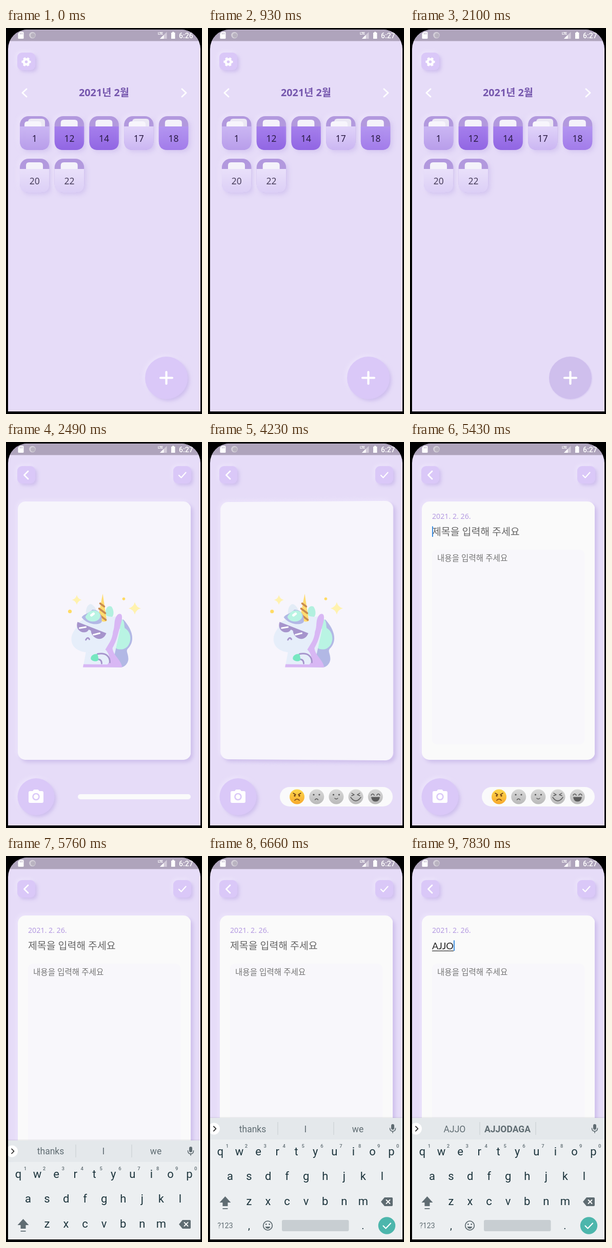
Recreate the animation shown at these times as an HTML page. Size 382 by 753 pixels, loop 8 s.

```html
<!DOCTYPE html>
<html lang="ko">
<head>
<meta charset="utf-8">
<title>Diary</title>
<style>
  html, body { margin: 0; width: 100%; height: 100%; overflow: hidden; background: #000; }
  #screen { position: absolute; left: 4px; top: 3px; width: 375px; height: 745px; overflow: hidden;
    background: #e6dcf8; border-radius: 38px 38px 0 0; }
  svg { position: absolute; left: 0; top: 0; width: 100%; height: 100%; }
  text { font-family: "Noto Sans", "Noto Sans CJK KR", "Noto Sans CJK JP", sans-serif; white-space: pre; }
  .mid { text-anchor: middle; }
  .ui { font-family: Roboto, sans-serif; }
  .line { fill: none; stroke-linecap: round; stroke-linejoin: round; }
  .raised { filter: drop-shadow(4px 4px 3px #cfbfee) drop-shadow(-3px -3px 4px #ece4fb); }
  .pocket { filter: drop-shadow(4px 4px 4px #d3c5f0) drop-shadow(-4px -4px 4px #ebe2fa); }
  #card { position: absolute; left: 18.5px; top: 113px; width: 337.5px; height: 504px; border-radius: 15px;
    box-shadow: 5px 5px 7px #cfc0ec, -3px -3px 7px #ece4fb; }
</style>
</head>
<body>
<div id="screen">
  <svg id="base" viewBox="4 3 375 745"></svg>
  <div id="card">
    <svg id="front" viewBox="22.5 116 337.5 504"></svg>
    <svg id="back" viewBox="22.5 116 337.5 504"></svg>
  </div>
  <svg id="top" viewBox="4 3 375 745"></svg>
</div>
<script>
const $ = id => document.getElementById(id);
const BUTTON = '#dac8f8';

const rect = (x, y, w, h, r, fill, more = '') =>
  `<rect x="${x}" y="${y}" width="${w}" height="${h}" rx="${r}" fill="${fill}" ${more}/>`;
const circle = (x, y, r, fill, more = '') => `<circle cx="${x}" cy="${y}" r="${r}" fill="${fill}" ${more}/>`;
const shape = (d, fill) => `<path d="${d}" fill="${fill}"/>`;
const line = (d, color, width) => `<path class="line" d="${d}" stroke="${color}" stroke-width="${width}"/>`;
const text = (x, y, size, fill, str, cls = '', more = '') =>
  `<text x="${x}" y="${y}" font-size="${size}" fill="${fill}" class="${cls}" ${more}>${str}</text>`;
const squareButton = (x, y) => rect(x, y, 35, 34, 9, BUTTON, 'class="raised"');
const show = (id, on) => { $(id).style.display = on ? '' : 'none'; };

// Home screen
function pocket(day, col, row, from, to, papers) {
  const x = 27 + col * 67.7, y = 172 + row * 83, id = 'g' + day;
  const paper = (dx, dy, fill) =>
    shape(`M${x + dx} ${y + 21}v${dy - 15}q0-6 6-6h21q6 0 6 6v${15 - dy}z`, fill);
  return `<linearGradient id="${id}" x2="0" y2="1"><stop stop-color="${from}"/><stop offset="1" stop-color="${to}"/></linearGradient>
    <g class="pocket">${rect(x, y, 57.5, 66, 17, '#b299de')}
    ${papers > 1 ? paper(16, 5, '#ebe8f4') + paper(9, 10, '#f7f5fc') : paper(12, 7, '#f4f2fa')}
    ${shape(`M${x} ${y + 20}h57.5v29q0 17-17 17h-23.5q-17 0-17-17z`, `url(#${id})`)}</g>
    ${text(x + 28.7, y + 50, 17.5, row ? '#493f5c' : '#2b1c45', day, 'mid', 'font-weight="300"')}`;
}

const home = `<g id="home">${squareButton(22, 48)}
  ${circle(39.5, 66, 5, 'none', 'stroke="#fff" stroke-width="4.4"')}
  ${circle(39.5, 66, 7.6, 'none', 'stroke="#fff" stroke-width="3" stroke-dasharray="4.3 3.66" stroke-dashoffset="2.15"')}
  ${line('M40 119l-8 7.5 8 7.5M343 119l8 7.5-8 7.5', '#fff', 2.8)}
  ${text(191, 133, 19.8, '#7556ad', '2021년 2월', 'mid', 'font-weight="600"')}
  ${pocket(1, 0, 0, '#cab6f3', '#b89dea', 2)}
  ${pocket(12, 1, 0, '#a57fec', '#9166e3', 1)}
  ${pocket(14, 2, 0, '#a57fec', '#9166e3', 1)}
  ${pocket(17, 3, 0, '#e0d3f9', '#cbb6f2', 2)}
  ${pocket(18, 4, 0, '#b395f0', '#a27cea', 1)}
  ${pocket(20, 0, 1, '#e9e0fa', '#dccff6', 1)}
  ${pocket(22, 1, 1, '#e9e0fa', '#dccff6', 1)}
  ${circle(312.5, 682.5, 41.5, BUTTON, 'id="add"')}
  ${line('M301 682.5h23M312.5 671v23', '#fff', 4.2)}</g>`;

// Editor screen
const INK = '#5d4a3c';
const faces = [
  line('M166 685l5 3M181 685l-5 3M169 699q4.500-5 9 0', '#6b3c12', 1.6) +
    circle(169, 690, 1.7, '#6b3c12') + circle(178, 690, 1.7, '#6b3c12'),
  circle(206, 688, 1.6, '#555') + circle(217, 688, 1.6, '#555') + line('M208.500 698q3-4 6 0', '#555', 1.3),
  circle(244.500, 688, 1.6, '#555') + circle(255.500, 688, 1.6, '#555') + line('M247 695q3 3 6 0', '#555', 1.3),
  line('M280 685l5 3-5 2M296 685l-5 3 5 2M278 693q10 14 20 0', '#555', 1.4),
  line('M318 689q3-5 6 0M329 689q3-5 6 0', '#555', 1.6) + shape('M318 692.500h17q-1 9-8.500 9t-8.500-9z', '#5a5a5a')
];
const emojis = faces.map((face, i) =>
  circle(173.5 + i * 38.2, 692, 14.5, i ? 'url(#grey)' : 'url(#gold)') + face).join('');

const editor = `<g id="editor">
  <linearGradient id="gold" x2="0" y2="1"><stop stop-color="#fdd84e"/><stop offset="1" stop-color="#f7a92c"/></linearGradient>
  <linearGradient id="grey" x2="0" y2="1"><stop stop-color="#d9d9d9"/><stop offset="1" stop-color="#b9b9b9"/></linearGradient>
  ${squareButton(22, 47)}${squareButton(326, 47)}
  ${line('M43 57l-7.500 7.500 7.500 7.500', '#fff', 2.8)}${line('M337 65l4.500 4.500 9-10', '#fff', 2.2)}
  ${circle(58.5, 692, 36, BUTTON, 'class="raised"')}
  ${shape('M47 681h5l2.500-3h8l2.500 3h5q3 0 3 3v17q0 3-3 3h-23q-3 0-3-3v-17q0-3 3-3z', '#fff')}
  ${circle(58.5, 692, 6, 'none', `stroke="${BUTTON}" stroke-width="2.6"`)}
  ${rect(140, 687, 220, 10, 5, '#fafafb', 'id="bar"')}
  <g id="emojis">${emojis}</g></g>`;

const sparkle = (x, y, r) => shape(`M${x} ${y - r}q${r * .2} ${r * .8} ${r} ${r}q${-r * .8} ${r * .2} ${-r} ${r}` +
  `q${-r * .2} ${-r * .8} ${-r} ${-r}q${r * .8} ${-r * .2} ${r} ${-r}z`, '#fff2ae');
const LILAC = '#b2b8e5', MINT = '#b9f4e3', PALE = '#e6eefa', PLUM = '#a694cc';

const unicorn = sparkle(137.5, 308, 9.5) + sparkle(250.5, 324.5, 12) +
  circle(124, 330.5, 3.6, '#ffdb63') + circle(229, 306, 2.8, '#ffdb63') +
  shape('M228 346C248 368 250 388 239 401C231 408 238 410 238 424C237 433 230 439 224 439.500L190 439 215 360z', LILAC) +
  shape('M224 344C232 350 229 358 231 363C247 372 245 399 228 404C213 407 205 398 212 380z', MINT) +
  shape('M156 338C153 324 161 313 167 317Q175 322 177 334z', '#e3ecf6') +
  shape('M194 338C192 324 198 318 205 321C211 329 210 341 204 343z', '#b2f0df') +
  shape('M150 438L156 406 200 350 222 365 206 438z', PALE) +
  shape('M127 385C127 369 139 364 140 352Q168 334 205 341L220 340 207 390C202 409 188 412 172 410C149 413 127 405 127 385z', PALE) +
  shape('M218 336C229 332 226 348 222 360C217 376 216 386 207 402C208 416 224 425 226 439.500H149.500L150.500 433.500 197 434C206 425 199 410 193 405C200 393 207 385 208 370C213 358 208 345 218 336z', '#d8b7f4') +
  shape('M188 296L179 343Q186 354 196 349z', '#ffdc70') +
  line('M183 315l8 6M181 325l12 9M181 337l13 10', '#c98b4f', 3.6) +
  shape('M147 342C150 336 160 335 168 327C181 327 188 338 186 351C180 359 157 356 147 342z', LILAC) +
  shape('M154 341C160 330 170 325 179 331C187 338 183 348 172 350C162 351 156 347 154 341z', MINT) +
  line('M166 338l4-3', '#fff', 5) +
  shape('M139 351L195 373C192 381 186 385 179 384C170 382 165 374 165 368L161 366C158 371 153 372 148 371C138 368 136 358 139 351z', PLUM) +
  line('M143 363l12-2M170 376l12-3', '#fff', 3) +
  line('M155 386q4-7 7-1', PLUM, 2.8) +
  line('M178 413.500C195 410 202 419 202 430M180 424Q186 425 186 432', PLUM, 3) +
  shape('M165 424C163 417 172 412 178 414L180 424C178 430 168 428 165 424z', '#76e7c1');

$('front').innerHTML = rect(22.5, 116, 337.5, 504, 15, '#f7f5fc') + unicorn;
$('back').innerHTML = rect(22.5, 116, 337.5, 504, 15, '#fafafa') +
  rect(42, 210, 298, 380, 10, '#f8f7fb') +
  text(42.5, 150, 14.2, '#b59be2', '2021. 2. 26.') +
  text(42.5, 182, 19.4, '#666', '제목을 입력해 주세요', '', 'id="hint" font-weight="500"') +
  text(52.5, 232, 15.6, '#757575', '내용을 입력해 주세요') +
  text(42.5, 182, 18.2, '#222', '', '', 'id="typed" style="font-family:Lato,sans-serif"') +
  rect(42.5, 184.5, 0, 1.3, 0, '#333', 'id="underline"') +
  rect(42.5, 164.5, 2, 20.5, 0, '#3e8ee0', 'id="cursor"');

// Keyboard
const KEY = '#1c343c', MUTED = '#5f6c72';
const keyRow = (letters, x, y) => [...letters].map((c, i) =>
  text(x + i * 37.05, y, 22, KEY, c, 'ui mid')).join('');
const digits = [...'1234567890'].map((d, i) =>
  text(37.500 + i * 36.9, 569, 9.5, MUTED, d, 'ui mid', 'font-weight="500"')).join('');

const keyboard = `<g id="keyboard">
  ${rect(4, 509, 375, 3, 0, '#0000000d')}${rect(4, 511, 375, 42, 0, '#e4e8eb')}${rect(4, 553, 375, 195, 0, '#eceff1')}
  ${circle(11.5, 532, 11.5, '#fff')}${line('M11 527.500l4.500 4.500-4.500 4.500', '#333', 1.8)}
  ${rect(135.5, 519, 1, 25, 0, '#c6cccf')}${rect(244.5, 519, 1, 25, 0, '#c6cccf')}
  ${[87, 190, 292].map((x, i) => text(x, 538.5, 17.5, MUTED, '', 'ui mid', `id="word${i}"`)).join('')}
  ${rect(357, 523, 6, 11, 3, MUTED)}${line('M354.500 531q0 6 5.500 6t5.500-6M360 537v3', MUTED, 1.6)}
  ${keyRow('qwertyuiop', 24, 584)}${digits}
  ${keyRow('asdfghjkl', 43, 632)}${keyRow('zxcvbnm', 80, 681)}
  ${shape('M33.500 664l11 12h-6v7h-10v-7h-6z', MUTED)}${rect(28.5, 687, 10, 1.8, 0, MUTED)}
  ${shape('M337 674.500l7-8.500h14q2 0 2 2v13q0 2-2 2h-14z', MUTED)}${line('M347.500 671l7 7M354.500 671l-7 7', '#fff', 1.9)}
  ${text(33.5, 726, 14, MUTED, '?123', 'ui mid')}${text(80, 728, 20, KEY, ',', 'ui mid')}${text(302, 728, 20, KEY, '.', 'ui mid')}
  ${circle(116.5, 721, 8.8, 'none', `stroke="${MUTED}" stroke-width="1.8"`)}
  ${circle(113.300, 718.5, 1.4, MUTED)}${circle(119.700, 718.5, 1.4, MUTED)}${shape('M111.500 723h10q-1.500 4-5 4t-5-4z', MUTED)}
  ${rect(144, 710, 130.5, 22, 3, '#c8ced2')}
  ${circle(348.5, 721, 16.7, '#4db6ac')}${line('M341.500 721.500l5 5 9.500-10', '#fff', 2.2)}</g>`;

const statusBar = rect(4, 3, 375, 22.5, 0, '#afa4bc') +
  shape('M27 7.500h6q1.500 0 1.500 1.500v10.500q0 1.500-1.500 1.500h-8q-1.500 0-1.500-1.500v-8.500z', '#fff') +
  line('M27.500 10v2M29.700 10v2M32 10v2', '#afa4bc', 1) +
  circle(51.5, 14, 6.3, '#d5d0da') + circle(52.5, 14.5, 4.5, '#b9b3c0') +
  text(296, 12.5, 7, '#fff', 'LTE', 'ui', 'font-weight="700" letter-spacing="-.7"') +
  shape('M313.500 7.500v13.500h-13.500z', '#d2cad9') + shape('M307.500 13.500v7.500h-7.500z', '#fff') +
  shape('M324 7.500h3.500v1.500h2v12h-7.500v-12h2z', '#fff') +
  text(337, 19.5, 14, '#fff', '', 'ui', 'id="clock" font-weight="500"');

$('base').innerHTML = home + editor;
$('top').innerHTML = keyboard + statusBar;

// Timeline: [start in ms, value]
const LOOP = 8000;
const TYPED = [[0, ''], [6990, 'A'], [7110, 'AJ'], [7170, 'AJJ'], [7800, 'AJJO']];
const WORDS = [[0, ['thanks', 'I', 'we']], [6810, ['Thanks', 'I', 'We']], [7050, ['A', 'And', 'At']],
  [7230, ['AJJ', 'AJ', 'Ajj']], [7830, ['AJJO', 'AJJODAGA', '']]];
const CURSOR = [[0, false], [5430, true], [5700, false], [6210, true], [6660, false],
  [6990, true], [7590, false], [7800, true]];
const ADD_FILL = [[0, BUTTON], [1410, '#d5c4f3'], [2100, '#cfbfed']];
const at = (track, t) => track.findLast(([start]) => start <= t)[1];
const clamp = v => Math.min(1, Math.max(0, v));
const stepped = (t, start, step) => start + Math.floor((t - start) / step) * step;

function render(t) {
  const editing = t >= 2490, expanded = t >= 2580;
  show('home', !editing);
  show('editor', editing);
  show('card', editing);
  show('emojis', expanded);
  $('clock').textContent = t < 930 ? '6:26' : '6:27';

  $('add').setAttribute('fill', at(ADD_FILL, t));
  $('add').style.filter = t < 1410 ? 'drop-shadow(4px 4px 3px #cfbfee) drop-shadow(-3px -3px 4px #ece4fb)'
    : 'drop-shadow(1px 1px 1px #d6c8f1)';

  $('bar').setAttribute('y', expanded ? 673 : 687);
  $('bar').setAttribute('height', expanded ? 38 : 10);
  $('bar').setAttribute('rx', expanded ? 19 : 5);

  const turn = t < 4230 ? 0 : clamp((stepped(t, 4230, 67.5) - 4200) / 300);
  const angle = 90 * (1 - Math.cos(Math.PI * turn));
  const flipped = angle > 90;
  show('front', !flipped);
  show('back', flipped);
  $('card').style.transform = angle % 180 ? `perspective(2800px) rotateY(${flipped ? 180 - angle : -angle}deg)` : 'none';

  const rise = t < 5670 ? 0 : clamp((stepped(t, 5670, 30) - 5640) / 210);
  show('keyboard', rise > 0);
  $('keyboard').setAttribute('transform', `translate(0 ${239 * (1 - rise) ** 2})`);

  const typed = at(TYPED, t);
  $('typed').textContent = typed;
  show('hint', !typed);
  const width = typed ? $('typed').getComputedTextLength() : 0;
  $('underline').setAttribute('width', width);
  $('cursor').setAttribute('x', 42.5 + width);
  show('cursor', at(CURSOR, t));

  at(WORDS, t).forEach((word, i) => { $('word' + i).textContent = word; });
  $('word1').setAttribute('font-weight', t >= 7830 ? 700 : 400);
}

function tick() {
  render(performance.now() % LOOP);
  requestAnimationFrame(tick);
}
tick();
</script>
</body>
</html>
```
